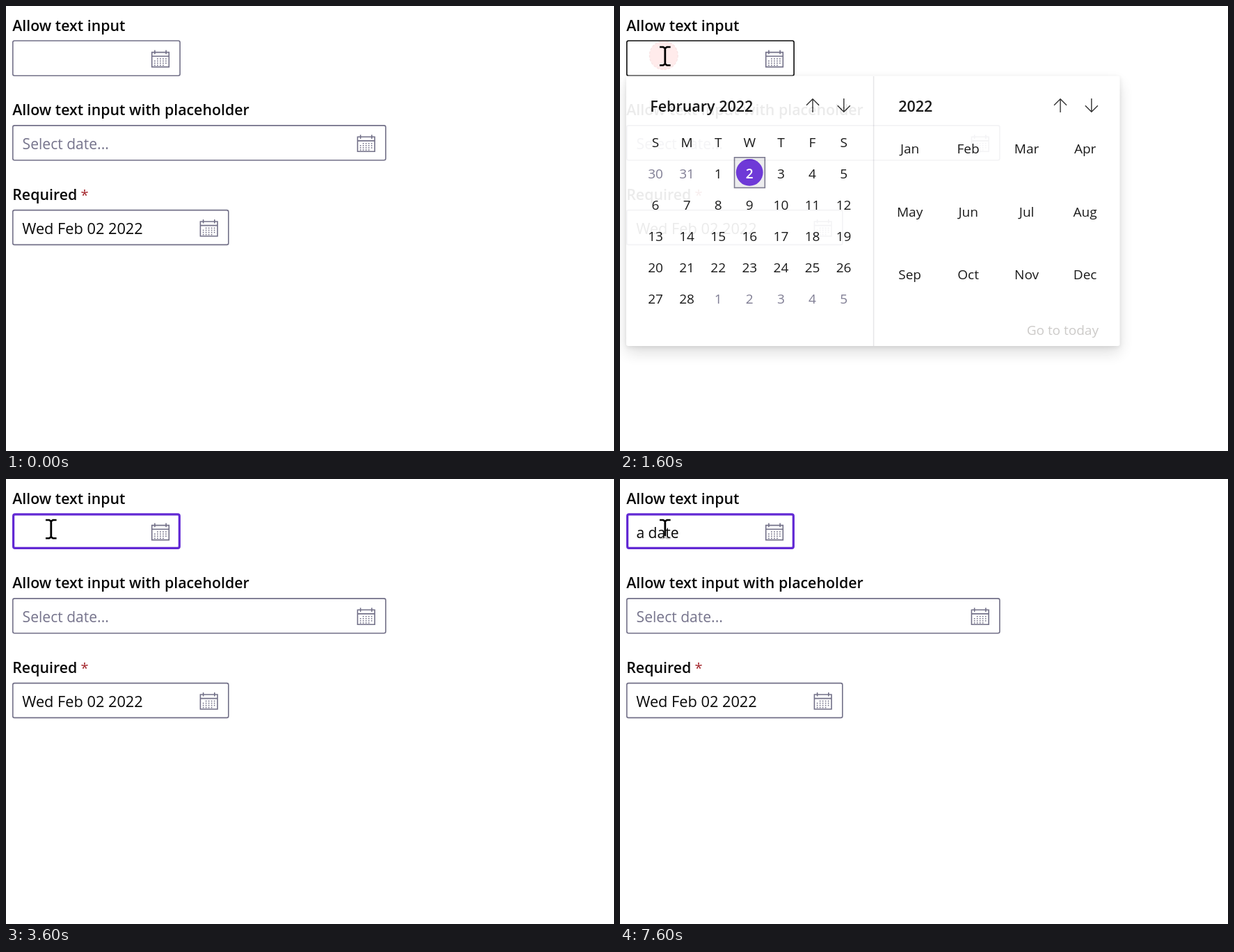
Recreate the animation shown at these times as an HTML page. Size 874x640 px, loop 8 s.

```html
<!DOCTYPE html>
<html lang="en">
<head>
<meta charset="utf-8">
<title>Date picker with text input</title>
<style>
  html, body { margin: 0; width: 100%; height: 100%; overflow: hidden; background: #fff; }
  svg { display: block; width: 874px; height: 640px; background: #fff; }
  text { font: 21.1px "Open Sans", "Noto Sans", sans-serif; fill: #080808; white-space: pre; }
  .label { font-size: 21.35px; font-weight: 600; }
  .title { font-size: 21.5px; font-weight: 600; }
  .date { font-size: 21.75px; }
  .small { font-size: 19px; text-anchor: middle; }
  .muted { fill: #76748c; }
  .picked { fill: #fff; font-weight: 600; }
  .link { font-size: 19px; fill: #c8c6c4; text-anchor: end; }
  .star { font-size: 20px; fill: #a4262c; }
  .line { fill: none; stroke: #727088; stroke-width: 1.6; }
  .arrow { fill: none; stroke: #222; stroke-width: 1.4; }
  .card { fill: #fff; filter: drop-shadow(0 10px 11px rgba(0, 0, 0, .13)) drop-shadow(0 2px 3px rgba(0, 0, 0, .11)); }
</style>
</head>
<body>
<svg id="stage" viewBox="0 0 874 640">
  <g id="form"></g>
  <text id="typed" x="23.4" y="84.8"></text>
  <g id="popup"></g>
  <rect id="caret" y="60.5" width="1.7" height="29.5" fill="#000"/>
  <circle id="pulse" cx="62.8" cy="71" fill="#ff6666" stroke="#c23030" stroke-width="1.3" stroke-dasharray="3.5 2"/>
  <g id="beam">
    <path d="M57 57.8H62.5L64.8 59.2L67 57.8H72.6V60.2H68L66.2 61.4V82H63.4V61.4L61.6 60.2H57Z"/>
    <path id="foot" d="M63.4 82H66.2V82.8L68 84H72.6V86.4H67L64.8 85L62.5 86.4H57V84H61.6L63.4 82.8Z"/>
  </g>
  <path id="pointer" d="M57.8 48V73.6L63.6 68L67.4 77L71.4 75.4L67.6 66.6H76Z" fill="#fff" stroke="#000" stroke-width="1.4"/>
</svg>
<script>
const $ = id => document.getElementById(id);

function add(parent, tag, attrs, content) {
  const el = document.createElementNS('http://www.w3.org/2000/svg', tag);
  for (const key in attrs) el.setAttribute(key, attrs[key]);
  if (content !== undefined) el.textContent = content;
  parent.appendChild(el);
  return el;
}
const write = (parent, x, y, content, cls) =>
  add(parent, 'text', { x, y, class: cls || '' }, content);

function calendarIcon(parent, x, y) {
  const g = add(parent, 'g', { transform: `translate(${x} ${y})` });
  add(g, 'path', { class: 'line', d: 'M.8 3H25.4V24H.8ZM.8 8.6H25.4M5 0V5.6M21.2 0V5.6' });
  for (let row = 0; row < 4; row++)
    for (let col = 0; col < 5; col++) {
      if (row === 0 && col === 0 || row === 3 && col === 4) continue;
      add(g, 'rect', { x: 4.2 + col * 4, y: 11.6 + row * 3.1, width: 1.6, height: 1.6, fill: '#727088' });
    }
}

function field(label, y, width) {
  write($('form'), 9.2, y - 13.8, label, 'label');
  const box = add($('form'), 'rect', {
    class: 'line', x: 9.8, y: y + .8, width: width - 1.6, height: 49.8, rx: 2.4
  });
  calendarIcon($('form'), width - 33, y + 14.2);
  return box;
}

const BOX = { x: 9, y: 49.2, width: 241.9, height: 51.8 };
const box = field('Allow text input', 49.4, BOX.width);
field('Allow text input with placeholder', 171.1, 537.6);
field('Required', 292.8, 311.6);
write($('form'), 23.6, 206.4, 'Select date...', 'muted');
write($('form'), 23.2, 328.2, 'Wed Feb 02 2022', 'date');
write($('form'), 107.6, 278.5, '*', 'star');

function buildPopup(g) {
  add(g, 'rect', { class: 'card', x: 9, y: 100.4, width: 709.5, height: 388.6, rx: 3 });
  add(g, 'path', { d: 'M364.6 101V489', stroke: '#e4e4e8', 'stroke-width': 1.5 });
  write(g, 43.2, 151.5, 'February 2022', 'title');
  write(g, 400.2, 152, '2022', 'title');
  for (const x of [277, 633]) {
    add(g, 'path', { class: 'arrow', d: `M${x} 153V133.6M${x - 9} 142.8l9 -9l9 9` });
    add(g, 'path', { class: 'arrow', d: `M${x + 44.8} 133V152.4M${x + 35.8} 143.2l9 9l9 -9` });
  }

  const colX = i => 51 + 45.1 * i;
  [...'SMTWTFS'].forEach((day, i) => write(g, colX(i), 202.6, day, 'small'));
  add(g, 'rect', { class: 'line', x: 164.5, y: 217.8, width: 43.8, height: 43.6, style: 'fill:#ebebed' });
  add(g, 'circle', { cx: 186.2, cy: 239.4, r: 19.4, fill: '#6229d4' });
  for (let i = 0; i < 35; i++) {
    const date = new Date(Date.UTC(2022, 0, 30 + i));
    const day = date.getUTCDate(), inMonth = date.getUTCMonth() === 1;
    const cls = !inMonth ? 'muted' : day === 2 ? 'picked' : '';
    write(g, colX(i % 7), 247.6 + 45.15 * Math.floor(i / 7), day, 'small ' + cls);
  }

  'Jan Feb Mar Apr May Jun Jul Aug Sep Oct Nov Dec'.split(' ').forEach((month, i) =>
    write(g, 416.6 + 84 * (i % 4), 212.2 + 90.3 * Math.floor(i / 4), month, 'small'));
  write(g, 688, 473.4, 'Go to today', 'link');
}
buildPopup($('popup'));

const LOOP = 8000;
const CARET_X = [23.4, 0, 40.4, 53.4, 0, 72.4, 84.8];
const START = { border: 'rest', cursor: '', ring: 0, popup: 0, caret: 0, chars: 0 };
const STEPS = [
  [800, { cursor: 'pointer' }],
  [1000, { cursor: 'beam', border: 'hover' }],
  [1200, { ring: 2.5 }],
  [1400, { ring: 12, border: 'focus', caret: 1 }],
  [1600, { ring: 21, border: 'hover', caret: 0, popup: .92 }],
  [1800, { ring: 0, popup: 1 }],
  [3000, { ring: 8, border: 'focus', caret: 1, popup: 0 }],
  [3200, { ring: 18 }],
  [3400, { ring: 0 }],
  [3600, { caret: 0 }],
  [4200, { caret: 1 }],
  [4600, { caret: 0 }],
  [5200, { caret: 1 }],
  [5400, { chars: 2 }],
  [5600, { chars: 3 }],
  [5800, { chars: 5 }],
  [6000, { chars: 6 }],
  [6600, { caret: 0 }],
  [7000, { caret: 1 }],
  [7600, { caret: 0 }]
];
const BORDERS = { rest: ['#727088', 1.6], hover: ['#0c0c0c', 1.6], focus: ['#6229d4', 3.2] };

const show = (id, on) => { $(id).style.display = on ? '' : 'none'; };

function draw(now) {
  const t = now % LOOP;
  const s = { ...START };
  for (const [time, change] of STEPS) if (time <= t) Object.assign(s, change);

  const [color, weight] = BORDERS[s.border];
  box.style.stroke = color;
  box.style.strokeWidth = weight;
  box.setAttribute('x', BOX.x + weight / 2);
  box.setAttribute('y', BOX.y + weight / 2);
  box.setAttribute('width', BOX.width - weight);
  box.setAttribute('height', BOX.height - weight);

  $('typed').textContent = 'a date'.slice(0, s.chars);
  $('caret').setAttribute('x', CARET_X[s.chars]);
  show('caret', s.caret);

  show('popup', s.popup);
  $('popup').style.opacity = s.popup;

  show('pulse', s.ring);
  $('pulse').setAttribute('r', Math.max(0, s.ring - .6));
  $('pulse').style.opacity = 1 - s.ring / 24;

  show('pointer', s.cursor === 'pointer');
  show('beam', s.cursor === 'beam');
  $('foot').style.opacity = s.chars > 4 ? .2 : 1;
}

function tick() {
  draw(performance.now());
  requestAnimationFrame(tick);
}
tick();
</script>
</body>
</html>
```
